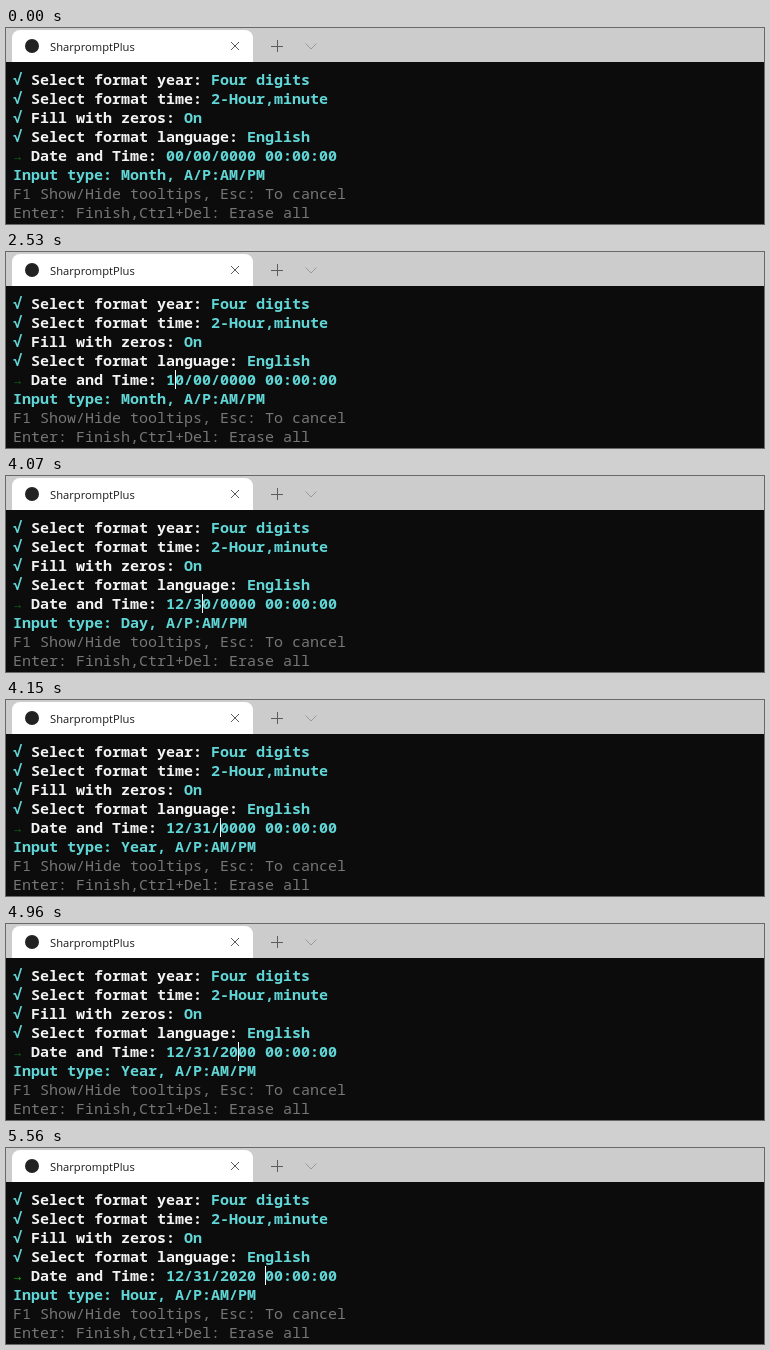
An HTML page for the animation above (8000 ms loop, 758 px wide and 196 px high).

```html
<!DOCTYPE html>
<html lang="en">
<head>
<meta charset="utf-8">
<title>Date and time prompt</title>
<style>
  html, body { margin: 0; width: 100%; height: 100%; overflow: hidden; background: #0c0c0c; }
  svg { display: block; width: 758px; height: 196px; }
  .term text { font: 600 15px "Noto Sans Mono", "DejaVu Sans Mono", monospace; white-space: pre; fill: #f2f2f2; }
  .term .cyan { fill: #61d6d6; }
  .term .dim { fill: #767676; font-weight: 500; }
  .tab { font: 11.2px "Open Sans", "Noto Sans", sans-serif; fill: #1a1a1a; }
  .icon { fill: none; stroke: #5c5c5c; }
</style>
</head>
<body>
<svg viewBox="0 0 758 196">
  <rect width="758" height="196" fill="#0c0c0c"/>
  <rect width="758" height="34" fill="#ccc"/>
  <path d="M6 34V10a8 8 0 0 1 8-8H239a8 8 0 0 1 8 8V34z" fill="#fff"/>
  <circle cx="26" cy="18" r="7" fill="#222"/>
  <text class="tab" x="44" y="22.5">SharpromptPlus</text>
  <path class="icon" d="M225 14l8 8m0-8l-8 8"/>
  <path class="icon" d="M265 18.5h12M271.5 12v12"/>
  <path class="icon" d="M299.500 15.500l5.500 5.500 5.500-5.500" style="stroke:#999"/>
  <g class="term" id="term"></g>
</svg>
<script>
  const LOOP = 8000, LEFT = 7, TOP = 42, CELL = 9, ROW = 19;
  const NS = 'http://www.w3.org/2000/svg';
  const term = document.getElementById('term');

  function add(tag, attrs) {
    const el = document.createElementNS(NS, tag);
    for (const key in attrs) el.setAttribute(key, attrs[key]);
    return term.appendChild(el);
  }

  function print(col, row, text, cls = '') {
    const el = add('text', { x: LEFT + col * CELL, y: TOP + row * ROW + 15, class: cls });
    el.textContent = text;
    return el;
  }

  [
    ['Select format year:', 'Four digits'],
    ['Select format time:', '2-Hour,minute'],
    ['Fill with zeros:', 'On'],
    ['Select format language:', 'English']
  ].forEach(([label, answer], row) => {
    print(0, row, '√', 'cyan');
    print(2, row, label);
    print(3 + label.length, row, answer, 'cyan');
  });

  const arrow = print(0, 4, '→');
  const label = print(2, 4, 'Date and Time:');
  const date = print(17, 4, '', 'cyan');
  const hint = print(0, 5, '', 'cyan');
  const help = [
    print(0, 6, 'F1 Show/Hide tooltips, Esc: To cancel', 'dim'),
    print(0, 7, 'Enter: Finish,Ctrl+Del: Erase all', 'dim')
  ];
  const cursor = add('rect', { y: TOP + 4 * ROW, width: 1, height: ROW, fill: '#fff' });

  // time, date, caret position (-1 hides it), expected field, label shown
  const steps = [
    [0, '00/00/0000', -1, 'Month'],
    [1460, '00/00/0000', 0, 'Month'],
    [2530, '10/00/0000', 1, 'Month'],
    [2600, '12/00/0000', 2, 'Month'],
    [2670, '12/00/0000', 3, 'Day'],
    [4070, '12/30/0000', 4, 'Day'],
    [4150, '12/31/0000', 6, 'Year'],
    [4620, '', -1, '', true],
    [4690, '12/31/2000', 7, 'Year'],
    [4960, '12/31/2000', 8, 'Year'],
    [5030, '', -1, '', false],
    [5100, '12/31/2020', 9, 'Year'],
    [5560, '12/31/2020', 11, 'Hour']
  ];

  const show = (el, on) => el.setAttribute('visibility', on ? 'visible' : 'hidden');

  function draw(time) {
    const [, day, caret, field, labelled = true] = steps.filter(s => s[0] <= time).pop();
    date.textContent = day && day + ' 00:00:00';
    hint.textContent = field && `Input type: ${field}, A/P:AM/PM`;
    help.forEach(el => show(el, field));
    show(label, labelled);
    show(arrow, labelled);
    arrow.style.fill = time < 5100 ? '#10580d' : '#16b00c';
    show(cursor, caret >= 0);
    cursor.setAttribute('x', LEFT + (17 + caret) * CELL);
  }

  const start = performance.now();
  function tick() {
    draw((performance.now() - start) % LOOP);
    requestAnimationFrame(tick);
  }
  tick();
</script>
</body>
</html>
```
